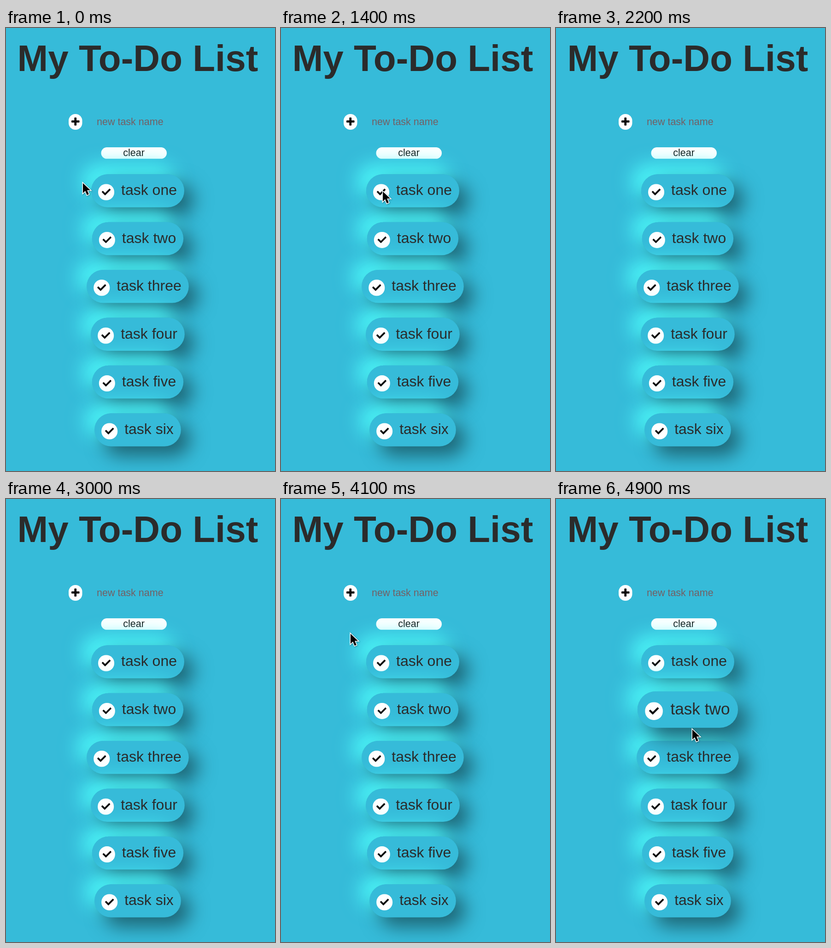
An HTML page with a canvas that plays this animation: 584x958 px, repeating every 5 s.

```html
<!DOCTYPE html>
<html lang="en">
<head>
<meta charset="utf-8">
<title>To-Do List</title>
<style>
  html, body { margin: 0; width: 100%; height: 100%; overflow: hidden; background: #36bbd9; }
  canvas { display: block; }
</style>
</head>
<body>
<canvas id="stage" width="584" height="958"></canvas>
<script>
const ctx = document.getElementById('stage').getContext('2d');
const FONT = '"Liberation Sans", Arial, sans-serif';
const BG = '#36bbd9', INK = '#2b2b2b', LIGHT = '#4df8fa', DARK = '#1d6474';
const LOOP = 5000, STEP = 100, MID = 286;
const PILL_H = 71.5, GROW = 1.1;

const check = new Path2D('M174 439L7 273c-10-10-10-26 0-36l36-36c10-10 26-10 36 0L192 313 432 73c10-10 26-10 36 0l36 36c10 10 10 26 0 36L210 439c-10 10-26 10-36 0z');
const arrow = new Path2D('M1 1.5V23L6.1 18.3 9.9 27.2 13.8 25.5 10.1 16.8H17z');

ctx.font = `32px ${FONT}`;
const tasks = ['one', 'two', 'three', 'four', 'five', 'six'].map((name, i) => {
  const label = 'task ' + name;
  return { label, w: ctx.measureText(label).width + 81, y: 352 + i * 103.4 };
});

// Pointer visits: [ms, x, y]
const visits = [
  [[0, 166, 334], [200, 270, 350], [600, 292, 560], [900, 295, 690], [1300, 300, 402],
   [1400, 220, 352], [1500, 158, 382], [1600, 100, 405], [1800, 27, 428]],
  [[3900, 46, 300], [4100, 150, 290], [4300, 285, 291], [4400, 292, 324], [4600, 294, 393], [4900, 295, 497]]
];

function pointerAt(t) {
  const path = visits.find(p => t >= p[0][0] && t <= p[p.length - 1][0]);
  if (!path) return null;
  const i = Math.max(1, path.findIndex(p => p[0] >= t));
  const [t0, x0, y0] = path[i - 1], [t1, x1, y1] = path[i];
  const k = (t - t0) / (t1 - t0);
  return { x: x0 + (x1 - x0) * k, y: y0 + (y1 - y0) * k };
}

function hoveredTask(p) {
  return p && tasks.find(k => Math.abs(p.x - MID) < k.w / 2 && Math.abs(p.y - k.y) < PILL_H / 2);
}

function box(x, y, w, h, r, color) {
  ctx.fillStyle = color;
  ctx.beginPath();
  ctx.roundRect(x, y, w, h, r);
  ctx.fill();
}

function text(str, x, y, size, color, align = 'left', weight = '') {
  ctx.font = `${weight} ${size}px ${FONT}`;
  ctx.textAlign = align;
  ctx.fillStyle = color;
  ctx.fillText(str, x, y);
}

function shadow(color, offset, blur) {
  ctx.shadowColor = color;
  ctx.shadowOffsetX = ctx.shadowOffsetY = offset;
  ctx.shadowBlur = blur;
}

function drawTask({ label, w, y }, s) {
  ctx.save();
  ctx.translate(MID, y);
  ctx.scale(s, s);
  const left = -w / 2;
  for (const [color, dir] of [[LIGHT, -1], [DARK, 1]]) {
    shadow(color, dir * 20 * s, 40 * s);
    box(left, -PILL_H / 2, w, PILL_H, PILL_H / 2, BG);
  }
  shadow('transparent', 0, 0);
  box(left + 15, -14.5, 35, 35, 17, '#fff');
  text(label, left + 65, 9.3, 32, INK);
  ctx.translate(left + 32.5, 2.6);
  ctx.scale(0.0375, 0.0375);
  ctx.translate(-256, -256);
  ctx.fillStyle = '#0a0a0a';
  ctx.fill(check);
  ctx.restore();
}

function drawPointer({ x, y }) {
  ctx.save();
  ctx.translate(x, y);
  shadow('rgba(0,0,0,.35)', 1, 3);
  ctx.strokeStyle = '#fff';
  ctx.lineWidth = 3;
  ctx.stroke(arrow);
  shadow('transparent', 0, 0);
  ctx.fillStyle = '#000';
  ctx.fill(arrow);
  ctx.restore();
}

function draw(t) {
  box(0, 0, 584, 958, 0, BG);
  text('My To-Do List', MID, 93, 80, INK, 'center', 'bold');
  box(136, 186, 29.5, 34, 14.5, '#fff');
  box(142, 199.8, 17.5, 4.8, 1.3, '#0a0a0a');
  box(148.3, 193.5, 4.8, 17.5, 1.3, '#0a0a0a');
  text('new task name', 197, 210, 21.5, '#735f64');
  box(206.5, 258, 142.5, 24.8, 12.4, '#fff');
  text('clear', 277.5, 277, 21.5, '#111', 'center');

  // The page reacts one step after the pointer; a grown pill sits on top.
  const active = hoveredTask(pointerAt(t - STEP));
  for (const k of tasks) if (k !== active) drawTask(k, 1);
  if (active) drawTask(active, GROW);

  const p = pointerAt(t);
  if (p) drawPointer(p);
}

let last = -1;
const start = performance.now();
function tick(now) {
  const t = Math.floor((Math.max(0, now - start) % LOOP) / STEP) * STEP;
  if (t !== last) draw(last = t);
  requestAnimationFrame(tick);
}
tick(start);
</script>
</body>
</html>
```
